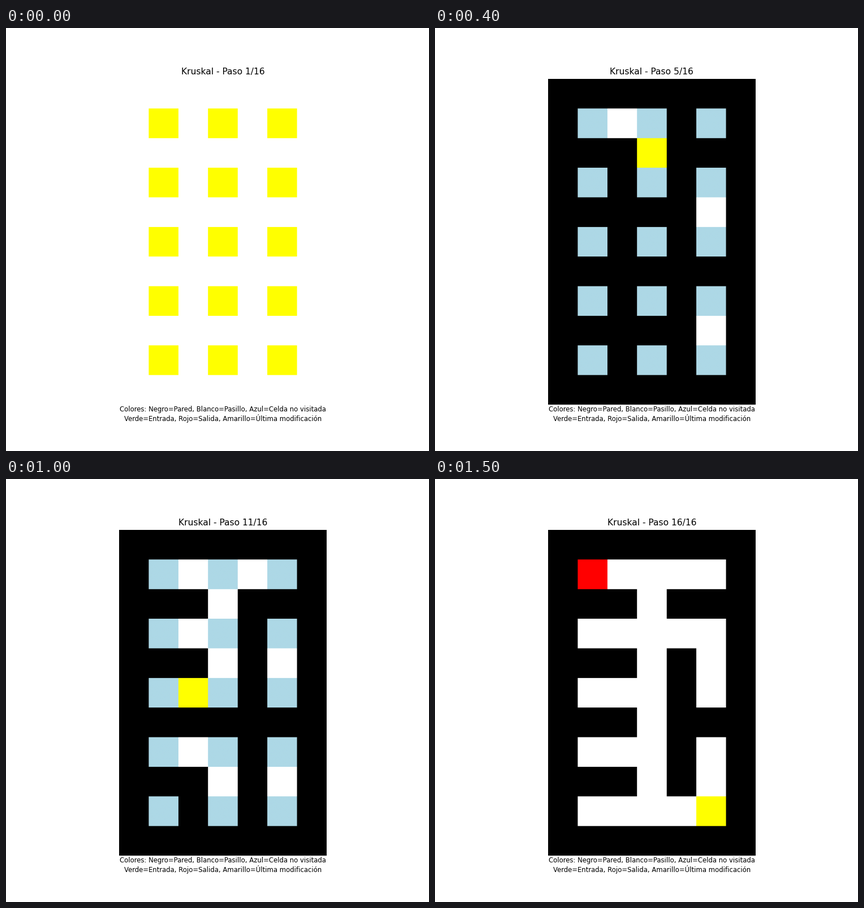
These frames come from a looping animation (748x748 px, 1600 ms). A matplotlib script:

```python
import numpy as np
import matplotlib.pyplot as plt
from matplotlib.animation import FuncAnimation
from matplotlib.colors import to_rgb

ROWS, COLS = 11, 7
STEPS = 16
CELL = 56  # samples per cell side, smoothed down for soft edges
BLACK, WHITE, BLUE, RED, YELLOW = map(
    to_rgb, ["black", "white", "lightblue", "red", "yellow"])

# Walls (row, col) in the order Kruskal's algorithm opens them
OPENED = [(8, 5), (4, 5), (1, 2), (2, 3), (8, 3), (1, 4), (7, 2),
          (3, 2), (4, 3), (5, 2), (6, 3), (9, 2), (3, 4), (9, 4)]
START, END = (1, 1), (9, 5)
LEGEND = ("Colores: Negro=Pared, Blanco=Pasillo, Azul=Celda no visitada\n"
          "Verde=Entrada, Rojo=Salida, Amarillo=Última modificación")


def grid(wall, cell):
    img = np.empty((ROWS, COLS, 3))
    img[:] = wall
    img[1::2, 1::2] = cell
    return img


def maze(step):
    """Colours of the maze at a step counted from zero."""
    if step == 0:
        return grid(WHITE, YELLOW)
    # The colour scale only covers the whole palette from the third step on
    if step == 1:
        img = grid(WHITE, BLACK)
    else:
        img = grid(BLACK, WHITE if step == STEPS - 1 else BLUE)
    for pos in OPENED[:step]:
        img[pos] = WHITE
    if step == STEPS - 1:
        img[START] = RED
        img[END] = YELLOW
    else:
        img[OPENED[step - 1]] = YELLOW
    return img


def enlarge(img):
    return img.repeat(CELL, axis=0).repeat(CELL, axis=1)


plt.rcParams["font.family"] = "DejaVu Sans"
fig, ax = plt.subplots(figsize=(8, 8), dpi=93.5)
ax.axis("off")
picture = ax.imshow(enlarge(maze(0)), interpolation="hanning")
title = ax.set_title("", fontsize=11.9)
ax.text(0.5, -0.05, LEGEND, transform=ax.transAxes, ha="center",
        fontsize=8.95, linespacing=1.12)


def update(step):
    picture.set_data(enlarge(maze(step)))
    title.set_text(f"Kruskal - Paso {step + 1}/{STEPS}")
    return picture, title


anim = FuncAnimation(fig, update, frames=STEPS, interval=100, repeat=True)
plt.show()
```
